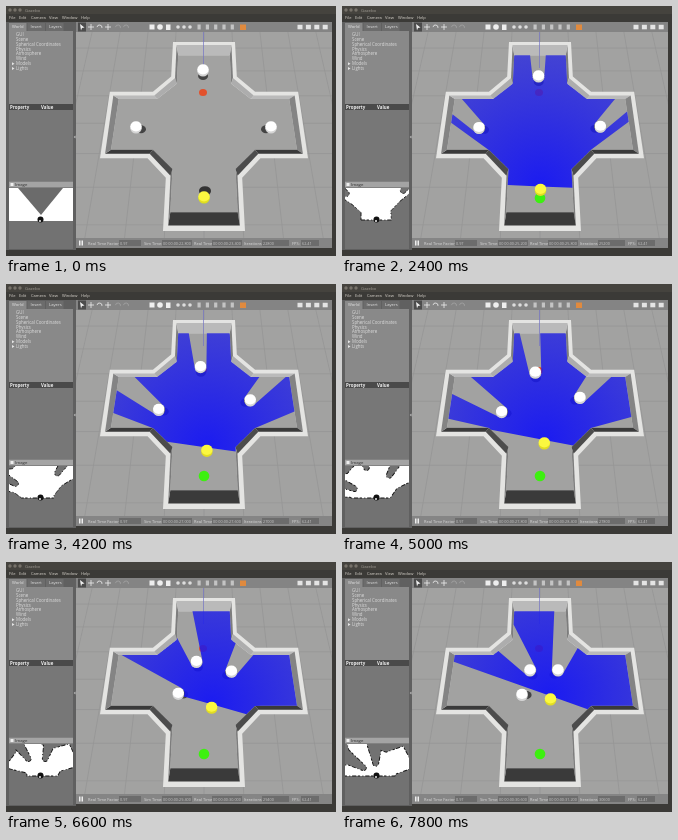
Animation, 330 px wide and 250 px high, one loop 8 s. Source, as an HTML page with a canvas:

```html
<!DOCTYPE html>
<html lang="en">
<head>
<meta charset="utf-8">
<title>Robot simulation</title>
<style>
  html, body { margin: 0; width: 100%; height: 100%; overflow: hidden; background: #3b3a37; }
  canvas { display: block; width: 330px; height: 250px; }
</style>
</head>
<body>
<canvas id="stage" width="330" height="250"></canvas>
<script>
const ctx = document.getElementById('stage').getContext('2d');
const LOOP = 8000, STEP = 200, SCAN_START = 200, MOVE_START = 1550, MOVE_END = 7800;
const CENTER = { x: 198, y: 117.3 };

// Ground plan to screen, seen by a tilted camera; drop 1 is the floor, 0 the wall tops
function project([x, y], drop = 0) {
  const depth = 1 - .0496 * y;
  return [CENTER.x + 35.3 * x / depth * (1 - .06 * drop),
          CENTER.y + 33.1 * y / depth * (1 - .13 * drop)];
}

// One arm of the cross, turned four times
function crossPlan(inset) {
  const half = 1 - inset, length = 2.8 - inset, bevel = 1.52 - inset * .41;
  let arm = [[half, -length], [half, -bevel], [bevel, -half], [length, -half]];
  const points = [];
  for (let i = 0; i < 4; i++) {
    points.push(...arm);
    arm = arm.map(([x, y]) => [-y, x]);
  }
  return points;
}

const OUTER = crossPlan(0).map(p => project(p));
const INNER = crossPlan(.12).map(p => project(p));
const FLOOR = crossPlan(.12).map(p => project(p, 1));

const mix = (from, to, k) => from + (to - from) * k;
const smooth = k => k * k * (3 - 2 * k);

function poses(t) {
  const k = Math.min(1, Math.max(0, (t - MOVE_START) / (MOVE_END - MOVE_START)));
  const early = k + .3 * k * k * (1 - k), late = k ** 1.5;
  return {
    robot: { x: mix(198, 208.5, late), y: mix(191, 137, early), turn: .34 * k },
    pillars: [
      { x: mix(197, 188, late), y: mix(64, 108, k) },
      { x: mix(130, 180, early), y: mix(121, 132.5, smooth(k)) },
      { x: mix(265, 216, k), y: mix(121, 108, smooth(k)) }
    ]
  };
}

function rect(x, y, w, h, color) {
  ctx.fillStyle = color;
  ctx.fillRect(x, y, w, h);
}

function disc(x, y, r, color, ry = r) {
  ctx.fillStyle = color;
  ctx.beginPath();
  ctx.ellipse(x, y, r, ry, 0, 0, 7);
  ctx.fill();
}

function text(str, x, y, color, size = 4.3, weight = '') {
  ctx.fillStyle = color;
  ctx.font = `${weight} ${size}px "Open Sans", sans-serif`;
  ctx.fillText(str, x, y);
}

function trace(points) {
  ctx.beginPath();
  points.forEach(([x, y]) => ctx.lineTo(x, y));
  ctx.closePath();
}

function fill(points, color) {
  trace(points);
  ctx.fillStyle = color;
  ctx.fill();
}

function line(x1, y1, x2, y2, color, width = .8) {
  ctx.strokeStyle = color;
  ctx.lineWidth = width;
  ctx.beginPath();
  ctx.moveTo(x1, y1);
  ctx.lineTo(x2, y2);
  ctx.stroke();
}

function clipTo(x, y, w, h) {
  ctx.save();
  ctx.beginPath();
  ctx.rect(x, y, w, h);
  ctx.clip();
}

function drawGround() {
  rect(70, 26, 256, 206, '#a2a2a1');
  for (let k = -6; k <= 6; k++) {
    line(...project([k, -5], 1), ...project([k, 5], 1), '#949494', .7);
    line(...project([-6, k], 1), ...project([6, k], 1), '#949494', .7);
  }
}

function drawArena() {
  fill(OUTER, '#e4e4e2');
  fill(FLOOR, '#a2a2a1');
  FLOOR.forEach((p, i) => {
    const j = (i + 1) % FLOOR.length, q = FLOOR[j];
    const facing = (q[0] - p[0]) / Math.hypot(q[0] - p[0], q[1] - p[1]);
    const shade = 122 + 64 * facing;
    fill([INNER[i], INNER[j], q, p], `rgb(${shade},${shade},${shade})`);
  });
  line(197.5, 26, 197.5, 62, '#7474c4', .7);
  disc(197, 86.5, 4, '#e2512c', 3.6);
}

// Distance along a ray to the nearest wall or cylinder
function reach(ox, oy, angle, pillars) {
  const dx = Math.cos(angle), dy = Math.sin(angle);
  let best = 260;
  FLOOR.forEach(([ax, ay], i) => {
    const [bx, by] = FLOOR[(i + 1) % FLOOR.length];
    const ex = bx - ax, ey = by - ay, det = dx * ey - dy * ex;
    const d = ((ax - ox) * ey - (ay - oy) * ex) / det;
    const u = ((ax - ox) * dy - (ay - oy) * dx) / det;
    if (d > 0 && u >= 0 && u <= 1) best = Math.min(best, d);
  });
  for (const p of pillars) {
    const px = p.x - ox, py = p.y - oy, along = px * dx + py * dy;
    const gap = 6.2 ** 2 - (px * px + py * py - along * along);
    if (gap > 0 && along > 0) best = Math.min(best, along - Math.sqrt(gap));
  }
  return best;
}

function scan(robot, pillars) {
  const ox = robot.x, oy = robot.y - 3, points = [[ox, oy]];
  for (let i = 0; i <= 500; i++) {
    const angle = Math.PI * (1 + i / 500) + robot.turn;
    const d = reach(ox, oy, angle, pillars);
    points.push([ox + d * Math.cos(angle), oy + d * Math.sin(angle)]);
  }
  return points;
}

function drawScan(points) {
  const [x, y] = points[0];
  const glow = ctx.createRadialGradient(x, y, 0, x, y, 150);
  glow.addColorStop(0, 'rgba(20,20,245,.95)');
  glow.addColorStop(.35, 'rgba(24,24,238,.86)');
  glow.addColorStop(1, 'rgba(34,34,228,.7)');
  fill(points, glow);
}

function drawCylinder(x, y, top, side) {
  disc(x, y + 1.2, 5.7, side, 5.3);
  disc(x, y - .6, 5.7, top, 5.1);
}

function drawCamera(points, robot, scanning) {
  clipTo(3, 182, 64, 61);
  rect(3, 182, 64, 61, '#727272');
  if (scanning) {
    ctx.translate(34.5, 214);
    ctx.rotate(-robot.turn);
    ctx.scale(.47, .47);
    ctx.translate(-points[0][0], -points[0][1]);
    fill(points, '#fff');
    ctx.setLineDash([5, 3, 9, 4, 2, 5]);
    ctx.strokeStyle = '#111';
    ctx.lineWidth = 2;
    trace(points.slice(1));
    ctx.stroke();
  } else {
    rect(3, 182, 64, 33, '#fff');
    fill([[12, 182], [57, 182], [35, 209]], '#6b6b6b');
  }
  ctx.restore();
  disc(34.5, 213.5, 3, '#111');
  disc(34, 215, 1, '#eee');
}

function drawToolbar() {
  rect(70, 16, 256, 10, '#848484');
  rect(72, 16.5, 8, 9, '#4c4c4c');
  fill([[74, 18], [78.5, 21.5], [76, 22], [75, 24.5]], '#eee');
  for (const x of [85, 102]) {
    line(x - 3, 21, x + 3, 21, '#eee');
    line(x, 18, x, 24, '#eee');
  }
  for (const x of [93.5, 112, 120]) {
    ctx.strokeStyle = x < 100 ? '#eee' : '#a5a5a5';
    ctx.lineWidth = .8;
    ctx.beginPath();
    ctx.arc(x, 21.5, 2.5, 3.3, 6.5);
    ctx.stroke();
  }
  rect(143.5, 18.5, 5, 5, '#eee');
  disc(154, 21, 2.8, '#eee');
  rect(160, 18.5, 4.5, 5.5, '#eee');
  for (let i = 0; i < 3; i++) disc(172 + i * 6, 21, 1.8, '#ddd');
  for (let i = 0; i < 5; i++) rect(191.5 + i * 8.3, 18.5, 3.2, 5, '#c4c4c4');
  rect(234, 18.5, 6, 5.5, '#e08a3e');
  for (let i = 0; i < 4; i++) rect(291.5 + i * 8.4, 18.8, 5, 4.5, '#e4e4e4');
}

function drawPanels() {
  rect(0, 0, 330, 250, '#3b3a37');
  rect(0, 0, 330, 8, '#45433e');
  for (let i = 0; i < 3; i++) disc(4 + i * 5, 4, 1.7, '#77726a');
  text('Gazebo', 19, 5.7, '#a09c94');
  [['File', 3], ['Edit', 13], ['Camera', 25], ['View', 43], ['Window', 56], ['Help', 75]]
    .forEach(([label, x]) => text(label, x, 12.7, '#dcd8d0', 4.1));

  rect(0, 16, 70, 228, '#606060');
  ['World', 'Insert', 'Layers'].forEach((label, i) => {
    rect(3 + i * 18.5, 17, 17.5, 8, i ? '#6c6c6c' : '#898989');
    text(label, 6 + i * 18.5, 22.2, '#e5e5e5', 4.2);
  });
  rect(3, 25, 64, 73, '#898989');
  ['GUI', 'Scene', 'Spherical Coordinates', 'Physics', 'Atmosphere', 'Wind', 'Models', 'Lights']
    .forEach((label, i) => {
      const y = 29.8 + i * 4.9;
      text(label, 10, y, '#ddd', 4.4);
      if (i > 5) fill([[6, y - 3], [8.5, y - 1.5], [6, y]], '#e5e5e5');
    });
  rect(3, 98, 64, 6, '#4a4a4a');
  text('Property', 4, 102.7, '#f0f0f0', 4.4, 'bold');
  text('Value', 35, 102.7, '#f0f0f0', 4.4, 'bold');
  rect(3, 104, 64, 71, '#777');
  rect(3, 175.5, 64, 6, '#a4a4a4');
  rect(4.5, 177, 3, 3, '#eee');
  text('Image', 9, 180.1, '#333');
  fill([[67.7, 131], [69.5, 129.5], [69.5, 132.5]], '#bbb');
}

function drawStatus(t) {
  rect(70, 232, 256, 10, '#858585');
  rect(73, 234.5, 1.5, 5, '#eee');
  rect(75.5, 234.5, 1.5, 5, '#eee');
  const clock = s => '00 00:00:' + s.toFixed(3);
  const seconds = 22.8 + t / 1000;
  [['Real Time Factor:', 82, '0.97', 114, 22],
   ['Sim Time:', 138, clock(seconds), 157, 30],
   ['Real Time:', 188, clock(seconds + .6), 207, 30],
   ['Iterations:', 238, Math.round(seconds * 1000), 257, 27],
   ['FPS:', 286, '62.41', 296, 18]].forEach(([label, x, value, vx, width]) => {
    text(label, x, 238.5, '#ddd', 4);
    rect(vx - 1, 234, width, 6, '#6c6c6c');
    text(value, vx, 238.5, '#c8c8c8', 3.8);
  });
}

function render(t) {
  const { robot, pillars } = poses(t);
  const scanning = t >= SCAN_START;
  const points = scan(robot, pillars);

  drawPanels();
  drawCamera(points, robot, scanning);
  clipTo(70, 26, 256, 206);
  drawGround();
  drawArena();
  for (const p of pillars) {
    const angle = Math.atan2(125 - p.y, CENTER.x - p.x);
    disc(p.x + 5 * Math.cos(angle), p.y + 2 + 4 * Math.sin(angle), 5, '#444', 4);
  }
  if (scanning) drawScan(points);
  else disc(199, 185, 6, '#333', 4.8);
  disc(198, 192, 5.3, '#3df010');
  pillars.forEach(p => drawCylinder(p.x, p.y, '#fff', '#d5d5d5'));
  drawCylinder(robot.x, robot.y, '#fbf840', '#e2dd22');
  ctx.restore();
  drawToolbar();
  drawStatus(t);
}

function frame() {
  const t = performance.now() % LOOP;
  render(Math.floor(t / STEP) * STEP);
  requestAnimationFrame(frame);
}
frame();
</script>
</body>
</html>
```
